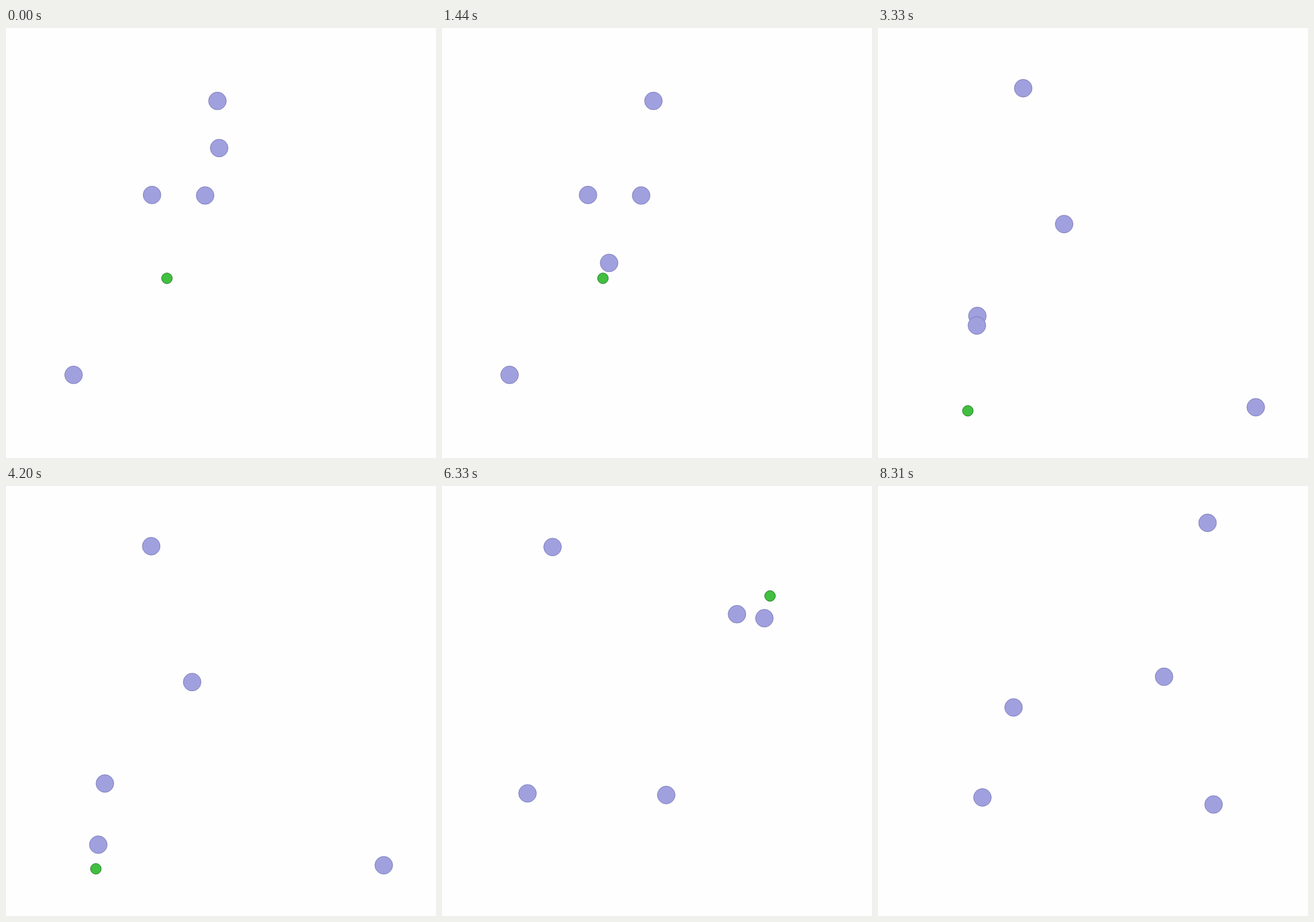
These frames come from a looping animation (700x700 px, 8340 ms). An HTML page with a canvas:

```html
<!DOCTYPE html>
<html>
<head>
<meta charset="utf-8">
<style>
html, body { margin: 0; width: 100%; height: 100%; overflow: hidden; background: #fefefe; }
canvas { display: block; }
</style>
</head>
<body>
<canvas id="stage" width="700" height="700"></canvas>
<script>
const ctx = document.getElementById('stage').getContext('2d');
const STEP = 30, LOOP = 8340;
const RATE = 1.61, DAMPING = 6 * RATE;

// Each episode: start and end in ms, goal, agent start, resting discs.
const episodes = [
  { from: 0, to: 1590, goal: [262, 407.5], agent: [347, 195.5],
    discs: [[344.2, 118.7], [237.7, 271.8], [324.2, 272.7], [110, 564.7]] },
  { from: 1590, to: 3120, goal: [290, 131.7], agent: [233, 325],
    discs: [[456, 107.8], [465.3, 175], [152.2, 477], [70, 546.2]] },
  { from: 3120, to: 4680, goal: [146.3, 623.2], agent: [165, 437],
    discs: [[236.4, 98], [303, 319.2], [161, 484.3], [615, 617.4]] },
  { from: 4680, to: 6690, goal: [534, 179], agent: [425, 609],
    discs: [[180, 99.3], [480.2, 208.7], [139.2, 500.4], [365, 503]] },
  { from: 6690, to: 8340, goal: [147.5, 500], agent: [402, 579],
    discs: [[536.5, 60], [465.7, 310.5], [220.7, 360.5], [546.3, 518.5]] }
];

function disc([x, y], radius, fill, edge) {
  ctx.beginPath();
  ctx.arc(x, y, radius, 0, 2 * Math.PI);
  ctx.fillStyle = fill;
  ctx.fill();
  ctx.strokeStyle = edge;
  ctx.stroke();
}

// Share of the way still to go, for an overdamped approach from rest.
const remaining = s =>
  (DAMPING * Math.exp(-RATE * s) - RATE * Math.exp(-DAMPING * s)) / (DAMPING - RATE);

function draw(now) {
  const time = Math.floor(now % LOOP / STEP) * STEP;
  const { from, to, goal, agent, discs } = episodes.find(e => time < e.to);
  const left = remaining((time - from) / 1000);
  const place = goal.map((g, i) => g + (agent[i] - g) * left);

  ctx.fillStyle = '#fefefe';
  ctx.fillRect(0, 0, 700, 700);
  ctx.lineWidth = 0.9;
  // The goal vanishes once the agent touches it.
  if (time < to - STEP) disc(goal, 8.7, '#40bf40', '#267326');
  for (const p of [place, ...discs]) disc(p, 14.4, '#a0a0df', '#7676b4');
}

const begin = performance.now();
function tick() {
  draw(performance.now() - begin);
  requestAnimationFrame(tick);
}
tick();
</script>
</body>
</html>
```
